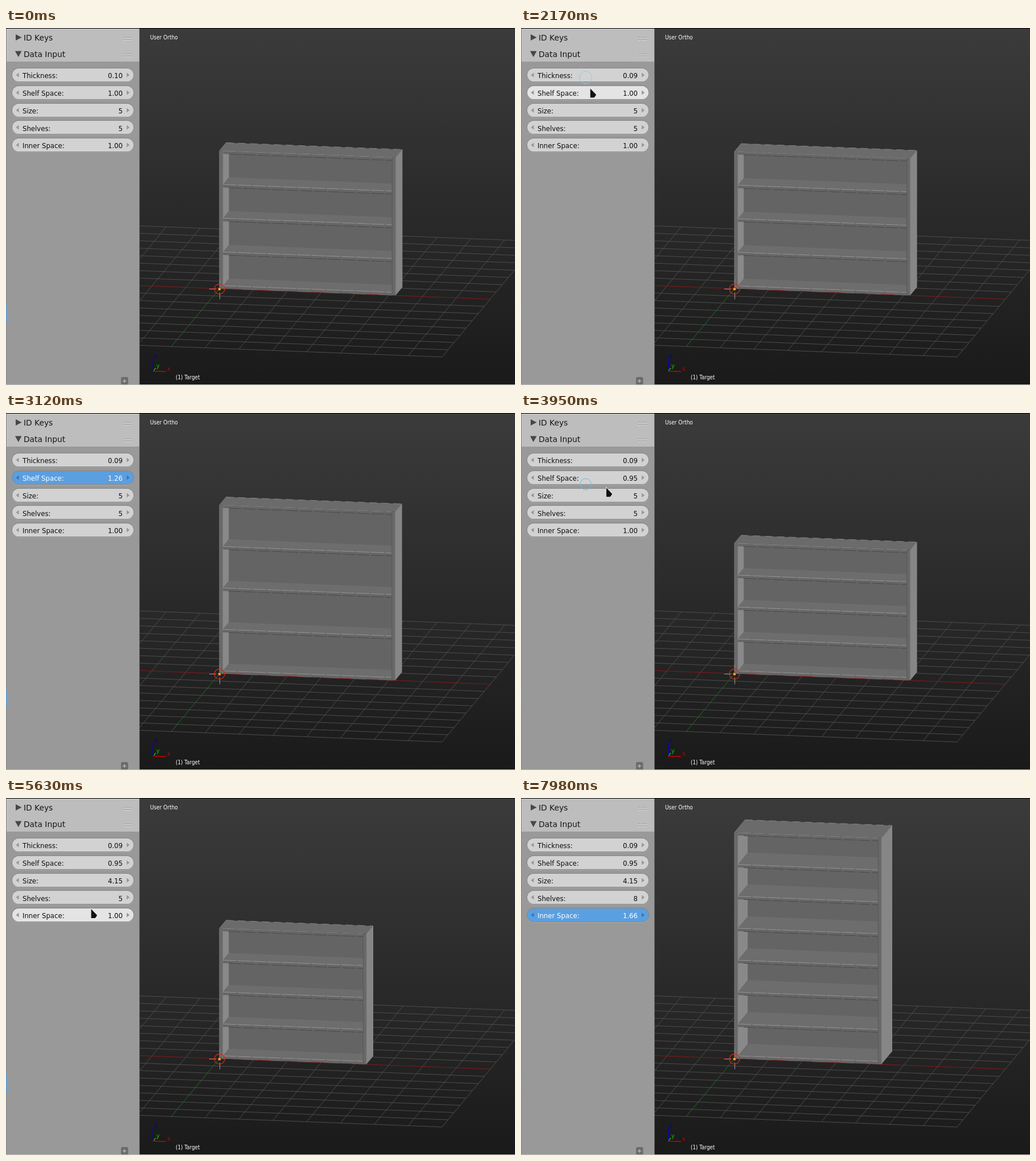
Write an HTML page with a canvas that moves like this. It is 894 px wide and 627 px high and loops after 8 s.

```html
<!DOCTYPE html>
<html lang="en">
<head>
<meta charset="utf-8">
<title>Parametric shelf</title>
<style>
  html, body { margin: 0; width: 100%; height: 100%; overflow: hidden; background: #222; }
  canvas { display: block; }
</style>
</head>
<body>
<canvas id="stage" width="894" height="627"></canvas>
<script>
const ctx = document.getElementById('stage').getContext('2d');
const LOOP = 8000, PANEL = 235, HOME_X = 113;

const labels = ['Thickness:', 'Shelf Space:', 'Size:', 'Shelves:', 'Inner Space:'];
const rowTop = i => 71 + 30.75 * i;

// A drag raises one field to a peak, then settles it before the release.
const drags = {
  thickness: { row: 0, press: 640, start: 740, peakAt: 1150, end: 1960, release: 1970,
    from: .1, peak: .186, to: .094, power: 1, x: HOME_X, y: 87 },
  gap: { row: 1, press: 2560, start: 2740, peakAt: 3320, end: 3620, release: 3790,
    from: 1, peak: 1.6, to: .946, power: 2, x: HOME_X, y: 125 },
  size: { row: 2, press: 4280, start: 4420, peakAt: 5240, end: 5390, release: 5390,
    from: 5, peak: 7.72, to: 4.15, power: 2, x: 816, y: 140 },
  inner: { row: 4, press: 7480, start: 7640, peakAt: 7960, end: LOOP, release: LOOP,
    from: 1, peak: 1.66, to: 1.66, power: .5, x: HOME_X, y: 206 }
};
const clicks = [6310, 6470, 6950];

// Between drags the pointer travels from one row to the next.
const moves = [
  { start: 1970, travel: 300, until: 2560, row: 0, toRow: 1, x: HOME_X, toX: HOME_X, sway: 10, dip: 0 },
  { start: 3790, travel: 300, until: 4280, row: 1, toRow: 2, x: HOME_X, toX: HOME_X, sway: 37, dip: 0 },
  { start: 5390, travel: 820, until: 7080, row: 2, toRow: 3, x: HOME_X, toX: 213, sway: 20, dip: 55 },
  { start: 7080, travel: 360, until: 7480, row: 3, toRow: 4, x: 213, toX: HOME_X, sway: 0, dip: 0 }
];

const clamp = v => Math.min(1, Math.max(0, v));
const mix = (a, b, k) => a + (b - a) * k;
const smooth = u => u * u * (3 - 2 * u);
const during = (t, a, b) => t >= a && t < b;

function dragValue(d, t) {
  if (t < d.peakAt) return mix(d.from, d.peak, clamp((t - d.start) / (d.peakAt - d.start)) ** d.power);
  return mix(d.peak, d.to, smooth(clamp((t - d.peakAt) / (d.end - d.peakAt))));
}

function modelAt(t) {
  const model = { shelves: 5 + clicks.filter(c => t >= c).length };
  for (const key in drags) model[key] = dragValue(drags[key], t);
  return model;
}

function cursorAt(t) {
  const m = moves.find(m => during(t, m.start, m.until));
  if (!m) return null;
  const u = clamp((t - m.start) / m.travel), k = smooth(u), arc = Math.sin(Math.PI * u);
  return {
    x: mix(m.x, m.toX, k) + m.sway * arc,
    y: mix(rowTop(m.row), rowTop(m.toRow), k) + 12.5 + m.dip * arc
  };
}

const project = (x, y, z) => [375 + 59.45 * x + 10.6 * y, 457.8 + 2.3 * x - 12.7 * y - 53.87 * z];
const world = points => points.map(p => project(...p));

function trace(points, close) {
  ctx.beginPath();
  points.forEach(p => ctx.lineTo(p[0], p[1]));
  if (close) ctx.closePath();
}
function fill(points, color) {
  trace(points, true);
  ctx.fillStyle = color;
  ctx.fill();
}
function line(points, color, width = 1, dash = []) {
  trace(points);
  ctx.strokeStyle = color;
  ctx.lineWidth = width;
  ctx.setLineDash(dash);
  ctx.stroke();
  ctx.setLineDash([]);
}
function rect(x, y, w, h, color) {
  ctx.fillStyle = color;
  ctx.fillRect(x, y, w, h);
}
function disc(x, y, r, color) {
  ctx.beginPath();
  ctx.arc(x, y, r, 0, Math.PI * 2);
  ctx.fillStyle = color;
  ctx.fill();
}
function ring(x, y, r, color, width = 1) {
  ctx.beginPath();
  ctx.arc(x, y, r, 0, Math.PI * 2);
  ctx.strokeStyle = color;
  ctx.lineWidth = width;
  ctx.stroke();
}
function pill(x, y, w, h, r, color) {
  ctx.beginPath();
  ctx.roundRect(x, y, w, h, r);
  ctx.fillStyle = color;
  ctx.fill();
}

// Without a condensed face, a smaller regular size keeps the same width.
const face = "px 'DejaVu Sans', sans-serif";
ctx.font = 'condensed 13' + face;
const hasCondensed = ctx.measureText('Thickness:').width < 65;
const condensed = px => (hasCondensed ? 'condensed ' + px : px * .9) + face;
function text(str, x, y, font, color, align = 'left') {
  ctx.font = font;
  ctx.textAlign = align;
  ctx.fillStyle = color;
  ctx.fillText(str, x, y);
}

function drawGround() {
  const sky = ctx.createLinearGradient(0, 0, 0, 627);
  sky.addColorStop(0, '#3b3b3b');
  sky.addColorStop(1, '#1a1a1a');
  rect(PANEL, 0, 659, 627, sky);
  for (let i = -8; i <= 8; i++) {
    line(world([[i, -8, 0], [i, 8, 0]]), i ? '#4d4d4d' : '#237023');
    line(world([[-8, i, 0], [8, i, 0]]), i ? '#4d4d4d' : '#851a1a');
  }
}

function drawShelf({ thickness: th, gap, size, inner, shelves }) {
  const w = size + 2 * th, r = w - th, d = inner + th;
  const h = (shelves - 1) * gap + shelves * th;
  const front = (x0, x1, z0, z1) => world([[x0, 0, z0], [x1, 0, z0], [x1, 0, z1], [x0, 0, z1]]);
  const level = (x0, x1, depth, z) => world([[x0, 0, z], [x1, 0, z], [x1, depth, z], [x0, depth, z]]);
  const side = (x, depth) => world([[x, 0, 0], [x, depth, 0], [x, depth, h], [x, 0, h]]);

  fill(side(w, d), '#868686');
  fill(level(0, w, d, h), '#6b6b6b');
  fill(front(0, w, 0, h), '#686868');

  ctx.save();
  trace(front(th, r, 0, h), true);
  ctx.clip();
  fill(front(th, r, 0, h), '#646464');
  fill(side(th, inner), '#898989');
  for (let k = 0; k < shelves; k++) {
    const z = k * (gap + th), top = z + th;
    fill(level(th, r, inner, top), '#6d6d6d');
    fill(front(th, r, z, top), '#666');
    line(world([[th, 0, top], [r, 0, top]]), '#969696', 1, [24, 2]);
    if (k) line(world([[th + .18, 0, z], [r, 0, z]]), '#494949', 1, [22, 3]);
  }
  ctx.restore();

  line(world([[th, 0, 0], [th, 0, h]]), '#777');
  line(world([[r, 0, 0], [r, 0, h]]), '#595959');
  line(world([[w, 0, 0], [w, 0, h], [w, d, h]]), '#777');
  line(world([[0, 0, 0], [0, 0, h], [0, d, h]]), '#7b7b7b');
  line(world([[0, d, h], [w, d, h]]), '#858585', 1, [13, 8]);
  line(world([[w, d, 0], [w, d, h]]), '#8c8c8c');
  line(world([[.3, 0, 0], [w, 0, 0]]), '#7d2020', 1, [22, 26]);
}

function drawMarkers() {
  const x = 375, y = 458.5;
  line([[x - 18, y], [x - 6, y]], '#9a9a9a');
  line([[x + 6, y], [x + 18, y]], '#333');
  line([[x + .5, y - 18], [x + .5, y - 6]], '#8a8a8a');
  line([[x + .5, y + 6], [x + .5, y + 18]], '#9a9a9a');
  ring(x, y, 9, '#d42a20', 1.3);
  disc(x, y, 3, '#4a2a08');
  disc(x, y, 2.3, '#ffa62b');

  line([[259, 602], [263, 597]], '#00c000', 1.5);
  line([[258.5, 602], [258.5, 580]], '#0000d8', 1.5);
  line([[258, 602.5], [281, 603.5]], '#d00000', 1.5);
  text('z', 260, 579, condensed(11), '#0000a0');
  text('y', 264, 597, condensed(11), '#00c800');
  text('x', 283, 602, condensed(11), '#c00000');
  text('User Ortho', 253, 20, condensed(10), '#fff');
  text('(1) Target', 298, 617, condensed(9.8), '#fff');
}

function drawRow(i, value, state) {
  const y = Math.round(rowTop(i)), mid = y + 11.5, baseline = Math.round(rowTop(i) + 17.3);
  const active = state === 'active';
  const shade = { idle: '#d2d2d2', hover: '#e4e4e4', active: '#5a9fe0' }[state];
  const arrow = active ? '#3f74a8' : '#989898';
  const ink = active ? '#fff' : '#0c0c0c';
  pill(10, y, 215, 25, 12.5, '#a9a9a9');
  pill(10, y - 1, 215, 25, 12.5, '#858585');
  pill(11, y, 213, 23, 11.5, shade);
  fill([[17.5, mid], [22.5, mid - 4], [22.5, mid + 4]], arrow);
  fill([[217, mid], [212, mid - 4], [212, mid + 4]], arrow);
  text(labels[i], 29, baseline, condensed(13), ink);
  text(value, 205, baseline, condensed(13), ink, 'right');
}

function drawHeader(title, baseline) {
  text(title, 31, baseline, '13.8' + face, '#161616');
  for (let k = 0; k < 8; k++) {
    const x = 207 + k % 4 * 3.7, y = baseline - 6 + (k >> 2) * 4;
    rect(x, y, 2, 1, '#888');
    rect(x, y + 1, 2, 1, '#f0f0f0');
  }
}

function drawPanel(t, model, cursor) {
  rect(0, 0, PANEL, 627, '#999');
  rect(1, 1, PANEL - 1, 58, '#bdbdbd');
  rect(0, 0, 1, 627, '#858585');
  rect(PANEL - 1, 0, 1, 627, '#606060');
  rect(0, 486, 1.5, 32, '#5a9fe0');

  fill([[17, 11], [27.5, 16.5], [17, 22]], '#474747');
  fill([[16, 40.5], [27.5, 40.5], [21.75, 51]], '#474747');
  drawHeader('ID Keys', 22);
  drawHeader('Data Input', 51);

  const held = Object.values(drags).find(d => during(t, d.press, d.release));
  const { thickness, gap, size, shelves, inner } = model;
  [thickness, gap, size, shelves, inner].forEach((value, i) => {
    const hover = cursor && during(cursor.y, rowTop(i), rowTop(i) + 23);
    const state = held && held.row === i ? 'active' : hover ? 'hover' : 'idle';
    drawRow(i, value === shelves ? String(value) : value.toFixed(2), state);
  });

  pill(202, 613, 12.5, 14, 2.5, '#6c6c6c');
  line([[205, 620], [211, 620]], '#b4b4b4', 1.5);
  line([[208, 617], [208, 623]], '#b4b4b4', 1.5);
}

function drawPointer(t, cursor) {
  for (const d of Object.values(drags)) {
    const travelled = clamp((t - d.press) / (d.release - d.press)) ** 2;
    const shown = d.x !== HOME_X || t > d.end;
    if (shown && during(t, d.press, d.release)) disc(mix(HOME_X, d.x, travelled), d.y, 6, '#0a55a8');

    const age = (t - d.release) / 235;
    if (during(age, 0, 1))
      ring(d.x + .5, d.y, 5 + 7 * age, `rgb(${60 + 110 * age * age},${150 + 75 * age * age},226)`);
  }
  if (!cursor) return;
  const shape = [[0, 0], [0, 16], [7, 16], [10.5, 11]].map(p => [p[0] + cursor.x, p[1] + cursor.y]);
  trace(shape, true);
  ctx.strokeStyle = '#eee';
  ctx.lineWidth = 1.6;
  ctx.stroke();
  fill(shape, '#101010');
}

function draw(now) {
  const t = now % LOOP, model = modelAt(t), cursor = cursorAt(t);
  drawGround();
  drawShelf(model);
  drawMarkers();
  drawPanel(t, model, cursor);
  drawPointer(t, cursor);
  rect(0, 0, 894, 1, '#000');
  rect(0, 626, 894, 1, '#bbb');
}

let origin;
function loop(now) {
  origin ??= now;
  draw(now - origin);
  requestAnimationFrame(loop);
}
draw(0);
requestAnimationFrame(loop);
</script>
</body>
</html>
```
